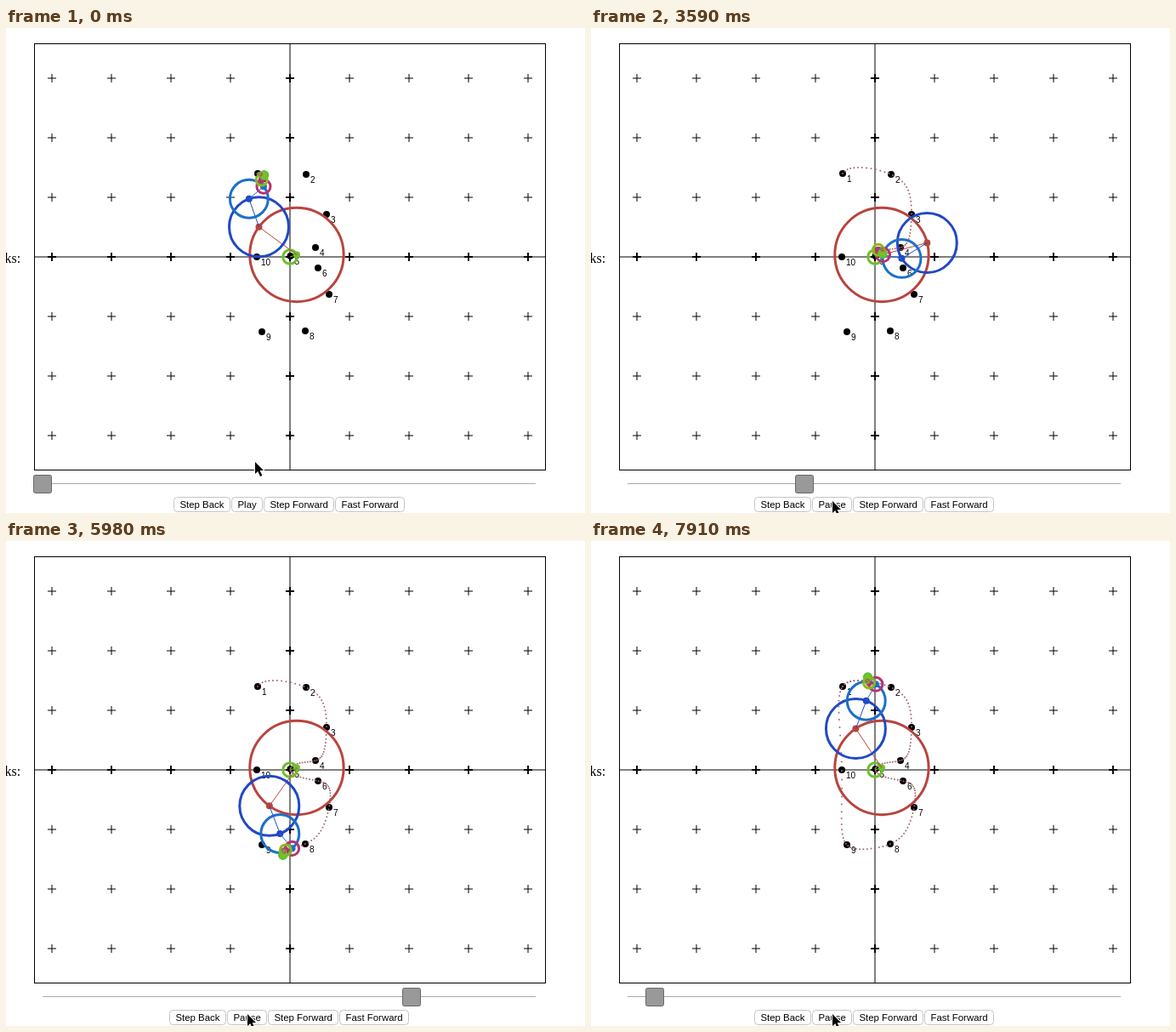
Animation of 681x570 px, one loop 8000 ms. Source, as an HTML page with a canvas:

```html
<!DOCTYPE html>
<html lang="en">
<head>
<meta charset="utf-8">
<title>Epicycles</title>
<style>
  html, body { margin: 0; width: 100%; height: 100%; overflow: hidden; background: #fff; }
  canvas { display: block; }
</style>
</head>
<body>
<canvas id="stage" width="681" height="570"></canvas>
<script>
const ctx = document.getElementById('stage').getContext('2d');
const TAU = Math.PI * 2;
const LOOP = 8000, PLAY_AT = 1300, REFRESH = 88;
const STEP = 0.05;                                // radians per tick
const TICKS_PER_TURN = Math.ceil(TAU / STEP);
const ORIGIN = { x: 334, y: 269 }, TRACK = 580;
const SANS = '"Liberation Sans", Arial, sans-serif';

// The ten numbered points, relative to the origin
const points = [[-38, -98], [19, -97], [43, -50], [30, -11], [0.5, -1],
                [33, 13], [46, 44], [18, 87], [-33, 88], [-39, 0]];

// Fourier term of the points for one frequency
function term(freq, color) {
  let re = 0, im = 0;
  points.forEach(([x, y], n) => {
    const a = TAU * freq * n / points.length;
    re += x * Math.cos(a) + y * Math.sin(a);
    im += y * Math.cos(a) - x * Math.sin(a);
  });
  return { freq, color, amp: Math.hypot(re, im) / points.length, phase: Math.atan2(im, re) };
}

// The constant comes first, the others by falling size
const terms = [
  term(0, '#6fbe2c'), term(1, '#b9443e'), term(2, '#2148c6'), term(-1, '#1b70c9'),
  term(-3, '#b5336e'), term(-2, '#8cb91c'), term(-5, '#62c13a'),
  term(-4, '#b0524c'), term(3, '#7fae34'), term(4, '#a0606a')
].sort((a, b) => !b.freq - !a.freq || b.amp - a.amp);

function joints(angle) {
  let { x, y } = ORIGIN;
  return terms.map(({ freq, amp, phase }) => {
    x += amp * Math.cos(phase + freq * angle);
    y += amp * Math.sin(phase + freq * angle);
    return { x, y };
  });
}

function ticksAt(t) {
  const refresh = Math.floor((t - PLAY_AT) / REFRESH);
  return Math.max(0, Math.floor(1.79 * refresh - 0.6));
}

// Progress from 0 to 1 between two times, slowing down, held per refresh
function glide(t, from, to) {
  const held = from + Math.floor((t - from) / REFRESH + 1) * REFRESH;
  const p = t < from ? 0 : Math.min(1, (held - from) / (to - from));
  return p * (2 - p);
}

function line(x0, y0, x1, y1, color = '#000') {
  ctx.strokeStyle = color;
  ctx.lineWidth = 1;
  ctx.beginPath();
  ctx.moveTo(x0, y0);
  ctx.lineTo(x1, y1);
  ctx.stroke();
}

function dot(x, y, r, color) {
  ctx.fillStyle = color;
  ctx.beginPath();
  ctx.arc(x, y, r, 0, TAU);
  ctx.fill();
}

function text(str, x, y, font) {
  ctx.fillStyle = '#000';
  ctx.font = font;
  ctx.fillText(str, x, y);
}

function box(x, y, w, h, r, fill, stroke) {
  ctx.beginPath();
  ctx.roundRect(x + 0.5, y + 0.5, w - 1, h - 1, r);
  ctx.fillStyle = fill;
  ctx.fill();
  ctx.strokeStyle = stroke;
  ctx.lineWidth = 1;
  ctx.stroke();
}

function drawGrid() {
  ctx.strokeStyle = '#000';
  ctx.lineWidth = 1;
  ctx.strokeRect(33.5, 18.5, 601, 501);
  line(334, 19, 334, 519);
  line(34, 269, 634, 269);
  for (let x = 54; x < 634; x += 70) {
    for (let y = 59; y < 519; y += 70) {
      // marks on an axis are overdrawn, so they look bolder
      const passes = x === ORIGIN.x || y === ORIGIN.y ? 4 : 1;
      for (let i = 0; i < passes; i++) {
        line(x - 5, y, x + 5, y);
        line(x, y - 5, x, y + 5);
      }
    }
  }
  text('ks:', -1.5, 276, '16px "Liberation Serif", Times, serif');
}

function drawPoints() {
  points.forEach(([px, py], n) => {
    const x = ORIGIN.x + px, y = ORIGIN.y + py;
    dot(x, y, 4, '#000');
    text(String(n + 1), x + 5, y + 10, '10px ' + SANS);
  });
}

function drawTrail(ticks) {
  for (let i = 0; i <= ticks; i++) {
    const tip = joints(i % TICKS_PER_TURN * STEP).pop();
    dot(tip.x, tip.y, 1, '#a06a6e');
  }
}

function drawCycles(angle) {
  let from = ORIGIN;
  joints(angle).forEach((to, k) => {
    const { amp, color } = terms[k];
    ctx.strokeStyle = color;
    ctx.lineWidth = amp > 3 ? 3 : 1.5;
    ctx.beginPath();
    ctx.arc(from.x, from.y, amp, 0, TAU);
    ctx.stroke();
    line(from.x, from.y, to.x, to.y, color);
    dot(to.x, to.y, amp > 5 ? 4 : Math.min(3, amp), color);
    from = to;
  });
}

function drawControls(angle, playing) {
  line(43, 535.5, 623, 535.5, '#aaa');
  box(32 + Math.round(TRACK * angle / TAU), 525, 22, 22, 2, '#999', '#686868');

  const font = '11.4px ' + SANS;
  ctx.font = font;
  const buttons = ['Step Back', playing ? 'Pause' : 'Play', 'Step Forward', 'Fast Forward']
    .map(label => ({ label, w: Math.round(ctx.measureText(label).width + 15) }));
  const total = buttons.reduce((sum, b) => sum + b.w + 1, -1);
  let x = Math.round(333 - total / 2);
  for (const { label, w } of buttons) {
    box(x, 551, w, 18, 4, '#fff', '#c4c4c4');
    text(label, x + 7.5, 564, font);
    x += w + 1;
  }
}

function drawCursor(t) {
  const toButton = glide(t, 360, 620), settle = glide(t, 1850, 2110);
  const x = 293 - 12 * toButton + 3 * settle;
  const y = 510 + 52 * toButton - 6 * settle;
  ctx.save();
  ctx.translate(x, y);
  const arrow = new Path2D('M0 0V14L3.2 11L6 17L8.4 16L5.6 10H10Z');
  ctx.lineJoin = 'round';
  ctx.lineWidth = 2;
  ctx.strokeStyle = '#fff';
  ctx.stroke(arrow);
  ctx.fillStyle = '#000';
  ctx.fill(arrow);
  ctx.restore();
}

function draw(t) {
  const ticks = ticksAt(t), angle = ticks % TICKS_PER_TURN * STEP;
  ctx.fillStyle = '#fff';
  ctx.fillRect(0, 0, 681, 570);
  drawGrid();
  drawPoints();
  drawTrail(ticks);
  drawCycles(angle);
  drawControls(angle, t >= PLAY_AT);
  drawCursor(t);
}

const start = performance.now();
function frame() {
  draw((performance.now() - start) % LOOP);
  requestAnimationFrame(frame);
}
frame();
</script>
</body>
</html>
```
